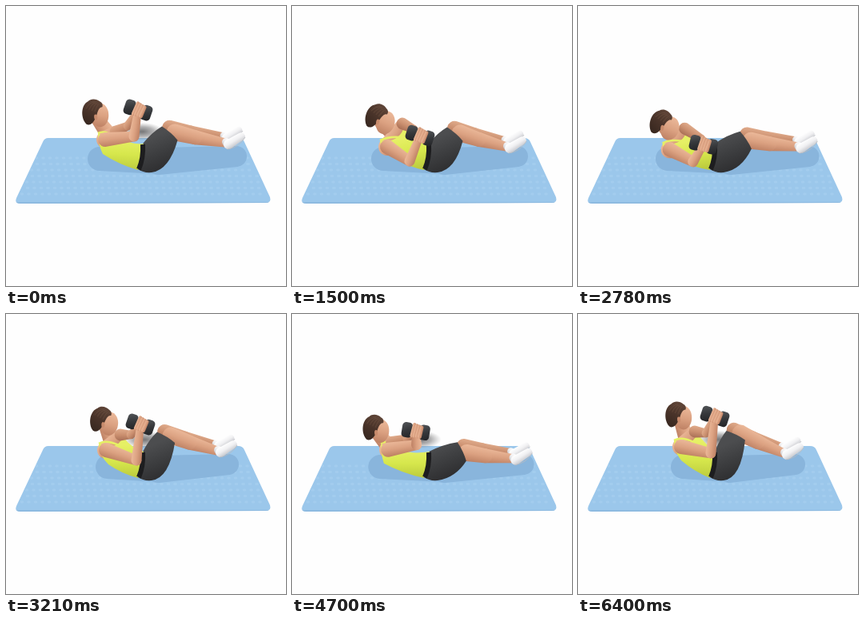
Animation, 350 px wide and 350 px high, one loop 6.42 s. Source, as an HTML page with a canvas:

```html
<!DOCTYPE html>
<html lang="en">
<head>
<meta charset="utf-8">
<title>Twisting crunch with dumbbell</title>
<style>
html, body { margin: 0; width: 100%; height: 100%; overflow: hidden; background: #fefefe; }
canvas { display: block; width: 350px; height: 350px; }
</style>
</head>
<body>
<canvas id="stage" width="350" height="350"></canvas>
<script>
const ctx = document.getElementById('stage').getContext('2d');
const LOOP = 6420, STEP = 213.3, LAST = 30;

const SKIN = ['#ebb899', '#dba181', '#bd8063'];
const FAR_SKIN = ['#e0ab8b', '#cb9070', '#a97056'];
const SHIRT = ['#e6f065', '#d6e74c', '#bccb3e'];
const CLOTH = ['#4c4d4f', '#3b3c3e', '#2b2b2d'];
const SHOE = ['#ffffff', '#f0f0f2', '#c8c9ce'];
const IRON = ['#505356', '#36383b', '#242528'];
const HAIR = ['#5e4437', '#493329', '#37271f'];

// Joint order: x,y pairs named in JOINTS, then head tilt, weight tilt (deg), face offset.
const JOINTS = ['head', 'shoulder', 'elbow', 'hand', 'farShoulder', 'farElbow', 'back', 'knee', 'ankle'];
const rising = [108, 133, 124, 167, 160, 163, 165, 130, 137, 157, 152, 150, 121, 185, 211, 158, 274, 171, 4, 19, 11];
const twisting = [105, 138, 119, 176, 147, 194, 160, 162, 138, 147, 152, 154, 131, 191, 210, 159, 268, 176, 22, 18, 15];
const frontOut = [91, 155, 107, 186, 127, 202, 148, 201, 126, 154, 153, 179, 120, 192, 224, 182, 281, 181, 26, 8, 16];
const returning = [118, 132, 125, 170, 163, 183, 168, 138, 143, 151, 156, 151, 128, 188, 206, 152, 264, 171, 12, 19, 13];
const crunched = [122, 126, 129, 166, 166, 174, 171, 128, 146, 147, 160, 149, 129, 183, 203, 149, 257, 174, 5, 18, 11];
const farOut = [94, 148, 117, 171, 152, 160, 149, 153, 117, 165, 138, 158, 110, 188, 224, 182, 282, 183, 8, 6, 11];

const keys = [
  [0, rising], [2, crunched], [4, crunched], [7, twisting], [10, frontOut], [11, frontOut],
  [15, returning], [17, crunched], [19, crunched], [23.5, farOut], [25, farOut], [30, crunched]
];

function slope(i, j) {
  const a = keys[Math.max(0, i - 1)], b = keys[Math.min(keys.length - 1, i + 1)];
  const here = keys[i];
  if (a === here || b === here) return 0;
  const left = (here[1][j] - a[1][j]) / (here[0] - a[0]);
  const right = (b[1][j] - here[1][j]) / (b[0] - here[0]);
  return left * right > 0 ? 2 * left * right / (left + right) : 0;
}

function poseAt(step) {
  let i = 0;
  while (i < keys.length - 2 && step >= keys[i + 1][0]) i++;
  const [t0, a] = keys[i], [t1, b] = keys[i + 1];
  const span = t1 - t0, u = (step - t0) / span;
  const v = a.map((start, j) => {
    const ease = u * u * (3 - 2 * u);
    return start + (b[j] - start) * ease
      + span * (slope(i, j) * u * (1 - u) ** 2 - slope(i + 1, j) * u * u * (1 - u));
  });
  const pose = {};
  JOINTS.forEach((name, n) => { pose[name] = [v[2 * n], v[2 * n + 1]]; });
  [pose.tilt, pose.weightTilt, pose.face] = v.slice(18);
  return pose;
}

const add = (p, x, y) => [p[0] + x, p[1] + y];
const mix = (p, q, u) => [p[0] + (q[0] - p[0]) * u, p[1] + (q[1] - p[1]) * u];

function shade(p, q, colors) {
  const g = ctx.createLinearGradient(...p, ...q);
  colors.forEach((c, i) => g.addColorStop(i / (colors.length - 1), c));
  return g;
}

function ellipse(x, y, rx, ry, fill, turn = 0) {
  ctx.beginPath();
  ctx.ellipse(x, y, rx, ry, turn, 0, 2 * Math.PI);
  ctx.fillStyle = fill;
  ctx.fill();
}

// Tapered capsule, lit from above.
function limb(p, q, r1, r2, colors) {
  const len = Math.hypot(q[0] - p[0], q[1] - p[1]) || 1;
  const a = Math.atan2(q[1] - p[1], q[0] - p[0]);
  const k = Math.acos(Math.max(-1, Math.min(1, (r1 - r2) / len)));
  ctx.beginPath();
  ctx.arc(...p, r1, a + k, a - k);
  ctx.arc(...q, r2, a - k, a + k);
  ctx.closePath();
  const m = mix(p, q, 0.5), r = Math.max(r1, r2), side = Math.cos(a) < 0 ? -1 : 1;
  const nx = Math.sin(a) * r * side, ny = -Math.cos(a) * r * side;
  ctx.fillStyle = typeof colors === 'string' ? colors : shade(add(m, nx, ny), add(m, -nx, -ny), colors);
  ctx.fill();
}

function floorShadow({ head, hand, ankle }) {
  const tone = '#89b5dc';
  limb([head[0] + 9, 191], [190, 195], 15, 15, tone);
  limb([190, 194], [ankle[0] + 14, 188], 17, 13, tone);
  if (hand[1] > 175) ellipse(hand[0] - 1, 223, 19, 8, tone);
}

function mat(pose) {
  ctx.beginPath();
  ctx.moveTo(53, 165);
  ctx.lineTo(290, 165);
  ctx.quadraticCurveTo(296, 165, 298, 170);
  ctx.lineTo(330, 239);
  ctx.quadraticCurveTo(332, 246, 325, 246);
  ctx.lineTo(18, 247);
  ctx.quadraticCurveTo(10, 247, 13, 240);
  ctx.lineTo(46, 170);
  ctx.quadraticCurveTo(48, 165, 53, 165);
  ctx.fillStyle = '#9bc7eb';
  ctx.fill();
  ctx.save();
  ctx.clip();
  for (let row = 0; row < 7; row++) {
    for (let x = 38 - row * 3 + row % 2 * 4; x < 306 + row * 3; x += 8.5) {
      ellipse(x, 190 + row * 7.5, 2.3, 1.8, 'rgba(190,222,246,.22)');
    }
  }
  ctx.fillStyle = '#8dbae0';
  ctx.fillRect(10, 245, 325, 3);
  floorShadow(pose);
  ctx.restore();
}

function backShadow({ hand }) {
  const strength = Math.max(0, Math.min(1, (160 - hand[1]) / 10));
  ctx.save();
  ctx.translate(hand[0] + 5, 157);
  ctx.scale(1, 0.42);
  const g = ctx.createRadialGradient(0, 0, 2, 0, 0, 27);
  g.addColorStop(0, `rgba(70,70,72,${0.7 * strength})`);
  g.addColorStop(0.5, `rgba(90,90,92,${0.45 * strength})`);
  g.addColorStop(1, 'rgba(120,120,120,0)');
  ellipse(0, 0, 27, 27, g);
  ctx.restore();
}

function leg(knee, ankle, size, skin) {
  const calf = add(mix(knee, ankle, 0.4), 0, 1);
  limb(calf, ankle, 9 * size, 5.5 * size, skin);
  limb(knee, calf, 10.5 * size, 9 * size, skin);
  const heel = add(ankle, 4, 2), toe = add(ankle, 20, -8);
  limb(add(ankle, 1, -1), heel, 5 * size, 5.8 * size, SHOE);
  limb(heel, toe, 6 * size, 4.8 * size, SHOE);
  ctx.beginPath();
  ctx.moveTo(heel[0] - 1, heel[1] + 6);
  ctx.quadraticCurveTo(heel[0] + 13, heel[1] + 4, toe[0] + 5, toe[1] + 1);
  ctx.strokeStyle = '#b9bbc0';
  ctx.lineWidth = 0.8;
  ctx.stroke();
}

function lowerBody({ knee, ankle }) {
  const hip = [183, 190];
  const a = Math.atan2(knee[1] - hip[1], knee[0] - hip[0]);
  const dx = Math.cos(a), dy = Math.sin(a);
  // Offset from a point on the thigh: along it, then towards the far side.
  const onThigh = (p, along, across) => add(p, dx * along + dy * across, dy * along - dx * across);

  leg(onThigh(knee, 0, 9), add(ankle, -3, -8), 0.88, FAR_SKIN);
  leg(knee, ankle, 1, SKIN);

  const top = onThigh(knee, -5, 17), low = onThigh(knee, -5, -9);
  ctx.beginPath();
  ctx.moveTo(171, 172);
  ctx.quadraticCurveTo((171 + top[0]) / 2 - 1, (172 + top[1]) / 2 - 3, ...top);
  ctx.quadraticCurveTo(...onThigh(knee, -3, 3), ...low);
  ctx.quadraticCurveTo(204, 205, 182, 208);
  ctx.quadraticCurveTo(172, 209, 165, 204);
  ctx.closePath();
  ctx.fillStyle = shade([180, 165], [198, 208], CLOTH);
  ctx.fill();
}

function torso(pose) {
  const { head, shoulder, farShoulder, back } = pose;
  const chest = mix(shoulder, farShoulder, 0.55);
  limb(add(head, 6, 8), add(chest, -3, -1), 8, 10, SKIN);
  limb(shoulder, farShoulder, 11, 7, SKIN);
  const strap = add(shoulder, -9, -8), farStrap = add(farShoulder, 3, 2);
  const waist = [165, 205];
  ctx.beginPath();
  ctx.moveTo(...strap);
  ctx.quadraticCurveTo(chest[0] + 5, chest[1] + 12, ...farStrap);
  ctx.quadraticCurveTo(farShoulder[0] + 14, farShoulder[1] + 17, 172, 172);
  ctx.lineTo(...waist);
  ctx.quadraticCurveTo(...add(mix(back, waist, 0.45), 0, 4), ...back);
  ctx.quadraticCurveTo(strap[0], strap[1] + 14, ...strap);
  ctx.fillStyle = shade(add(chest, 14, 4), [back[0] + 22, 205], SHIRT);
  ctx.fill();
  ctx.beginPath();
  ctx.moveTo(...strap);
  ctx.quadraticCurveTo(shoulder[0] + 1, shoulder[1] - 13, chest[0] + 5, chest[1] + 4);
  ctx.strokeStyle = SHIRT[0];
  ctx.lineWidth = 2.6;
  ctx.stroke();
  ctx.beginPath();
  ctx.moveTo(171, 173);
  ctx.quadraticCurveTo(172, 190, 166, 204);
  ctx.strokeStyle = '#1d1d1f';
  ctx.lineWidth = 6;
  ctx.stroke();
}

function arm(shoulder, elbow, hand, size, skin) {
  limb(shoulder, elbow, 9 * size, 6.3 * size, skin);
  limb(elbow, hand, 6.5 * size, 4.5 * size, skin);
}

function dumbbell({ hand, weightTilt }) {
  ctx.save();
  ctx.translate(...hand);
  ctx.rotate(weightTilt * Math.PI / 180);
  ctx.fillStyle = '#77797b';
  ctx.fillRect(-7, -2, 14, 4);
  for (const x of [-11, 11]) {
    ctx.beginPath();
    ctx.roundRect(x - 6.5, -9.5, 13, 19, 4.5);
    ctx.fillStyle = shade([x - 4, -9], [x + 4, 9], IRON);
    ctx.fill();
  }
  ctx.restore();
}

function fingers({ hand, weightTilt }) {
  ctx.save();
  ctx.translate(...hand);
  ctx.rotate(weightTilt * Math.PI / 180);
  ctx.translate(1, -1);
  for (let i = 0; i < 4; i++) {
    const x = i * 3.2 - 4.8;
    limb([x + 1, -7 + i * 0.7], [x, 7], 2.2, 2.5, SKIN);
  }
  ctx.restore();
}

function headShape({ head, tilt, face }) {
  ctx.save();
  ctx.translate(...head);
  ctx.rotate(tilt * Math.PI / 180);
  ctx.scale(0.92, 0.95);
  ellipse(face, 3, 8 + face * 0.3, 15.5, shade([face, -12], [face - 2, 19], SKIN), -0.08);
  ctx.beginPath();
  ctx.moveTo(-7, 16);
  ctx.bezierCurveTo(-16, 8, -16, -9, -7, -14);
  ctx.bezierCurveTo(-3, -19, 5, -18, 9, -15);
  ctx.quadraticCurveTo(14, -13, 13, -8);
  ctx.quadraticCurveTo(9, -8, 7, -1);
  ctx.quadraticCurveTo(5, 9, 1, 14);
  ctx.quadraticCurveTo(-3, 18, -7, 16);
  ctx.fillStyle = shade([5, -16], [-8, 16], HAIR);
  ctx.fill();
  ctx.strokeStyle = 'rgba(130,96,76,.35)';
  ctx.lineWidth = 1;
  for (let i = 0; i < 4; i++) {
    ctx.beginPath();
    ctx.moveTo(-9 + i * 4, -4 + i);
    ctx.quadraticCurveTo(-5 + i * 4, -13, 2 + i * 2, -14 + i);
    ctx.stroke();
  }
  ellipse(5, 6, 2.2, 3.8, '#c98c6d', -0.2);
  ctx.restore();
}

function draw(pose) {
  ctx.fillStyle = '#fefefe';
  ctx.fillRect(0, 0, 350, 350);
  mat(pose);
  backShadow(pose);
  lowerBody(pose);
  torso(pose);

  const near = () => arm(pose.shoulder, pose.elbow, pose.hand, 1, SKIN);
  const far = skin => arm(pose.farShoulder, pose.farElbow, pose.hand, 0.82, skin);
  if (pose.hand[1] > 178) {
    near();
    dumbbell(pose);
    far(SKIN);
  } else {
    far(FAR_SKIN);
    near();
    dumbbell(pose);
  }
  fingers(pose);
  headShape(pose);
}

function frame() {
  const time = performance.now() % LOOP;
  draw(poseAt(Math.min(LAST, Math.floor(time / STEP))));
  requestAnimationFrame(frame);
}
frame();
</script>
</body>
</html>
```
